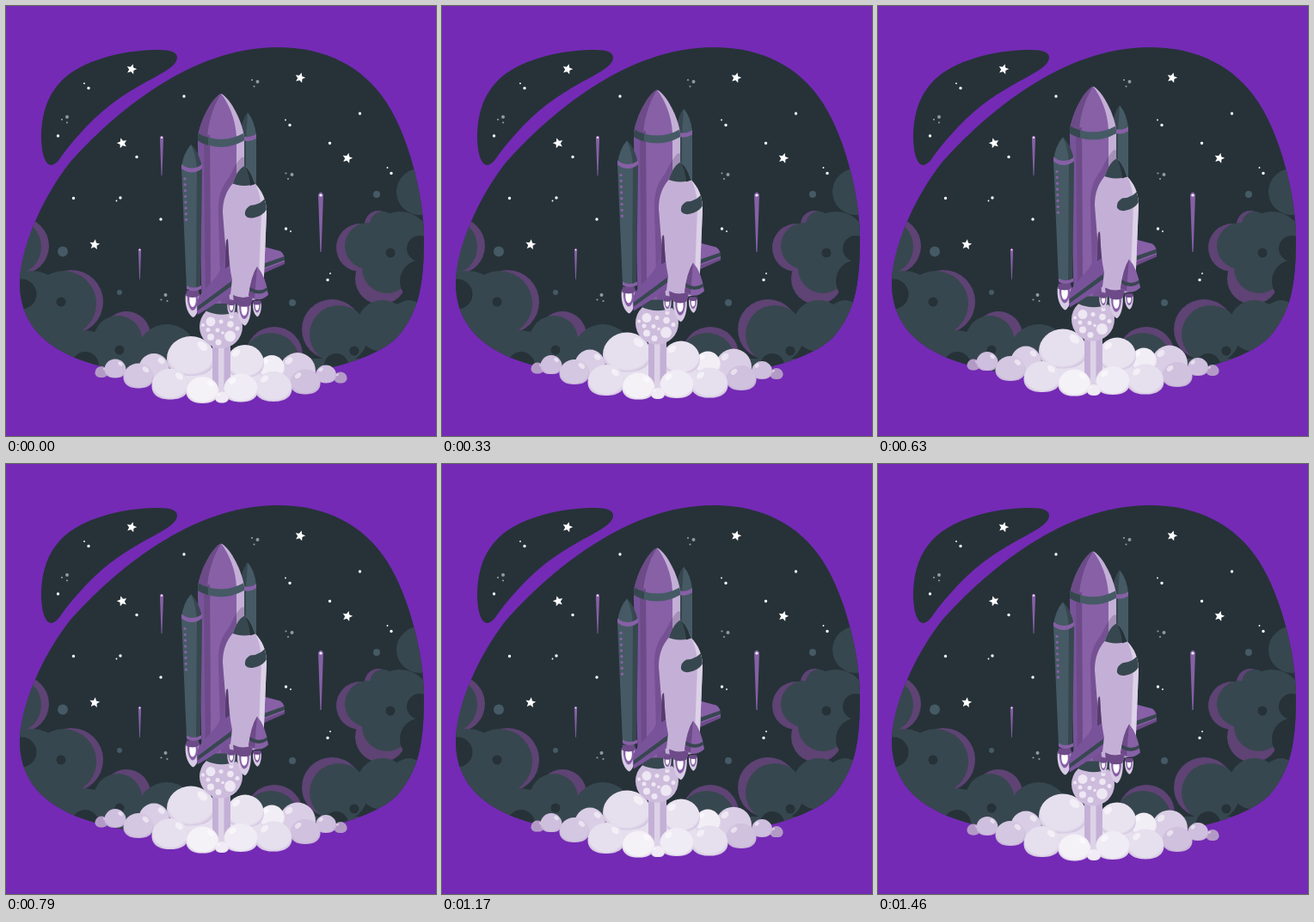
An HTML page that plays this animation: 500 px wide and 500 px high, repeating every 1.5 s.

```html
<!DOCTYPE html>
<html lang="en">
<head>
<meta charset="utf-8">
<title>Rocket launch</title>
<style>
html, body { margin: 0; width: 100%; height: 100%; overflow: hidden; background: #742ab5; }
svg { display: block; width: 100%; height: 100%; }
.dark { fill: #263238; }
.slate { fill: #37474f; }
.teal { fill: #455a64; }
.plum { fill: #5e4374; }
.deep { fill: #6d4a88; }
.grape { fill: #78539a; }
.violet { fill: #8760a6; }
.lilac { fill: #c4b0d6; }
.pale { fill: #ddd2e7; }
.dots { fill: none; stroke: #fff; stroke-linecap: round; }
</style>
</head>
<body>
<svg viewBox="0 0 500 500">
<defs>
  <path id="blob" d="M315 48C372 48 415 70 443 113C470 155 486 225 486 270C486 330 478 358 455 385C425 415 350 432 250 434C170 434 120 424 80 409C35 390 16 360 16 322C16 285 40 225 75 181C125 125 215 48 315 48Z"/>
  <clipPath id="inBlob"><use href="#blob"/></clipPath>
  <path id="tank" d="M250 102C258 105 273 128 277 152V346H228L223 152C227 128 242 105 250 102Z"/>
  <clipPath id="inTank"><use href="#tank"/></clipPath>
  <path id="orbiter" d="M277 186C270 190 266 199 264 206C256 215 252 226 252 240L260 341Q280 347 299 338L303 240C303 226 298 215 289 206C287 199 283 190 277 186Z"/>
  <clipPath id="inOrbiter"><use href="#orbiter"/></clipPath>
  <path id="star" d="M0-6.2L1.7-2.3 5.9-1.9 2.7.9 3.6 5 0 2.8-3.6 5-2.7.9-5.9-1.9-1.7-2.3Z" fill="#fff"/>
  <g id="meteor"><path class="violet" d="M-3 2Q0-3 3 2L.6 69H-.6Z"/><circle cy="3" r="1.6" fill="#fff"/></g>
  <g id="flame">
    <path fill="#d8cbe5" d="M-8 0C-10 14-4 26 1 27C6 24 9 12 8 0Z"/>
    <path class="violet" d="M-6-1C-7 11-3 19 0 19C4 19 7 10 6-1Z"/>
    <path fill="#fff" d="M-3.500 3C-4.500 11-2 15 0 15C3 14 4.500 10 3.500 3Z"/>
    <path class="deep" d="M-7-4H7L8 2Q0 6-8 2Z"/>
  </g>
  <radialGradient id="shade" cx=".5" cy=".47" r=".56">
    <stop offset=".82" stop-color="#a98bc0" stop-opacity="0"/>
    <stop offset="1" stop-color="#a98bc0" stop-opacity=".4"/>
  </radialGradient>
</defs>

<path class="dark" d="M199 60C199 75 160 85 120 116C95 136 75 160 63 177C50 195 42 180 41 155C41 125 48 98 75 78C105 58 145 51 178 51C192 51 199 54 199 60Z"/>
<use href="#blob" class="dark"/>

<g clip-path="url(#inBlob)">
  <g class="plum">
    <circle cx="17" cy="279" r="33"/><circle cx="76" cy="344" r="37"/><circle cx="140" cy="383" r="28"/>
    <circle cx="433" cy="254" r="16"/><circle cx="412" cy="281" r="28"/><circle cx="436" cy="317" r="30"/>
    <circle cx="379" cy="376" r="35"/><circle cx="312" cy="406" r="33"/>
  </g>
  <g class="slate">
    <circle cx="8" cy="280" r="33"/><circle cx="67" cy="346" r="38"/><circle cx="130" cy="388" r="28"/>
    <circle cx="187" cy="405" r="35"/><circle cx="30" cy="350" r="42"/>
    <path d="M16 345L80 375 230 400V440H60Z"/>
    <circle cx="481" cy="216" r="27"/><circle cx="438" cy="254" r="15"/><circle cx="421" cy="279" r="27"/>
    <circle cx="443" cy="305" r="29"/><circle cx="458" cy="275" r="36"/>
    <circle cx="387" cy="382" r="34"/><circle cx="438" cy="372" r="30"/><circle cx="470" cy="367" r="25"/>
    <circle cx="308" cy="413" r="33"/><path d="M280 410H440V440H280Z"/>
  </g>
  <g class="dark">
    <circle cx="18" cy="335" r="17.5"/><circle cx="64" cy="344" r="5.5"/><circle cx="92" cy="418" r="16"/>
    <circle cx="132" cy="400" r="5.5"/><circle cx="447" cy="287" r="5.5"/><circle cx="481" cy="282" r="15"/>
    <circle cx="483" cy="320" r="25"/><circle cx="405" cy="401" r="5.5"/><circle cx="384" cy="418" r="14"/>
  </g>
  <g class="teal">
    <circle cx="66" cy="285.5" r="6"/><circle cx="132" cy="333" r="3"/>
    <circle cx="333" cy="345" r="4"/><circle cx="431" cy="219" r="4"/>
  </g>
</g>

<use href="#star" transform="translate(146 73.5)rotate(15)"/>
<use href="#star" transform="translate(342 83.5)rotate(15)"/>
<use href="#star" transform="translate(135 159.5)rotate(-15)"/>
<use href="#star" transform="translate(397 177)rotate(15)"/>
<use href="#star" transform="translate(103 277.5)rotate(8)"/>
<path class="dots" stroke-width="3.4" d="M96 95.5h0M60.5 151h0M207 105h0M152 175.5h0M78.5 223.5h0M133 223h0M180 248h0M411.5 125h0M376.5 159.5h0M330 138.5h0M448 194.5h0M325.5 259h0M374 318.5h0"/>
<path class="dots" stroke-width="1.8" d="M91 90h0M128.5 226.5h0M325 132.5h0M443.5 188h0M331 262h0M377 311h0"/>
<g style="opacity:.5">
  <path class="dots" stroke-width="4" d="M71 129h0M292.5 88h0M332.5 196h0M185.5 336h0"/>
  <path class="dots" stroke-width="2.2" d="M65 132h0M71 135.5h0M286 86h0M288.5 93.5h0M325.5 194.5h0M328 201h0M180.5 341.5h0M187.5 343h0"/>
</g>
<use href="#meteor" transform="translate(181 151)scale(.7 .67)"/>
<use href="#meteor" transform="translate(366 217)"/>
<use href="#meteor" transform="translate(155.5 282)scale(.55 .52)"/>

<g id="launch">
  <ellipse cx="250" cy="432" rx="58" ry="15" fill="#e6dfee"/>
  <g id="backPuffs"></g>
  <path class="lilac" d="M240 385H261V452H240Z"/>
  <path class="pale" d="M247 385H253.500V452H247Z"/>
  <circle cx="250" cy="373" r="25" fill="#cdbcdc"/>
  <g fill="#eee7f4">
    <circle cx="238" cy="367" r="5.5"/><circle cx="250" cy="367" r="2.5"/><circle cx="261" cy="370" r="3.8"/>
    <circle cx="260.5" cy="384" r="6.5"/><circle cx="238" cy="385" r="4"/><circle cx="247" cy="391" r="3.5"/>
    <circle cx="235" cy="376.5" r="2.5"/><circle cx="246" cy="377" r="2.5"/><circle cx="229" cy="371" r="2"/>
    <circle cx="269" cy="375" r="2.5"/><circle cx="252" cy="380" r="1.8"/><circle cx="262" cy="361" r="2.5"/>
  </g>

  <path class="teal" d="M281 124Q289 133 291 150V235H272V152Q274 133 281 124Z"/>
  <path class="slate" d="M281 124Q274 133 272 152V235H279V155Z"/>
  <path class="violet" d="M272 150Q282 155 291 149V154Q282 160 272 155Z"/>

  <path class="slate" d="M229 343H272L269 355Q250 363 231 354Z"/>
  <use href="#tank" class="violet"/>
  <g clip-path="url(#inTank)">
    <path class="deep" d="M250 102C240 118 235 137 234 153L221 155V100Z"/>
    <path class="grape" d="M222 150H237L238 346H226Z"/>
    <path class="deep" d="M230 150H237L238 346H232Z"/>
    <path class="lilac" d="M250 102C259 113 267 132 268 152V200H280V100Z"/>
    <path fill="#3a1c50" opacity=".22" d="M274 176C266 184 263 193 259 200C249 212 246 226 247 243L250 346H280V176Z"/>
    <path class="teal" d="M222 147Q250 163 278 147V156Q250 172 222 156Z"/>
    <path class="slate" d="M222 147Q228 151 235 153V162Q228 160 222 156Z"/>
  </g>

  <use href="#flame" transform="translate(217 335)"/>
  <path class="teal" d="M215 161Q225 171 228 188L226 329Q218 334 210 329L204 188Q206 171 215 161Z"/>
  <path class="slate" d="M215 161Q225 171 228 188L226 329 221 331 222 190Q221 173 215 161Z"/>
  <path class="violet" d="M204 184Q216 193 228 184V189Q216 198 204 189Z"/>
  <path class="violet" d="M210 325Q218 330 227 325V329Q218 334 210 329Z"/>
  <path class="dots" style="stroke:#8760a6" stroke-width="3.4" stroke-dasharray="0 6.8" d="M208 201L209.5 250"/>

  <path class="violet" d="M300 280L319 285Q325 289 324 299L299 310Z"/>
  <path class="slate" d="M301 299L324 291V295.500L300 304.500Z"/>
  <path class="deep" d="M300 306L324 297V300L299 311Z"/>

  <use href="#flame" transform="translate(262 346)scale(.55)"/>
  <use href="#flame" transform="translate(292 345)scale(.6)"/>
  <use href="#flame" transform="translate(277 346)scale(.95)"/>
  <use href="#orbiter" class="lilac"/>
  <g clip-path="url(#inOrbiter)">
    <path class="pale" d="M286 200C294 212 297 225 297 240L293 342H310V186Z"/>
    <path class="slate" d="M260 184H294V205Q277 213 260 205Z"/>
    <path class="dark" d="M277 184Q283 195 284 209L295 205V184Z"/>
    <path class="slate" d="M304 219Q299 231 284 232Q277 236 278 243Q281 248 289 246Q299 244 304 235Z"/>
  </g>
  <path class="grape" d="M258 271Q259 300 263 319L261 335 223 359Q220 349 224 338L245 314Q254 301 256 273Q257 270 258 271Z"/>
  <path class="slate" d="M262 320L223 349V354L262 326Z"/>
  <path fill="#563b6c" d="M258 271Q259 289 260 302L255 305Q255 288 256 273Z"/>
  <path class="deep" d="M264 336Q276 342 287 336L286 345Q276 350 265 345Z"/>
  <path class="violet" d="M292 303Q302 314 305 336Q294 346 282 337Q285 314 292 303Z"/>
  <path class="deep" d="M292 303Q285 314 282 337L289 340Z"/>
  <path class="slate" d="M284 327Q294 334 304 327V331Q294 338 283 331Z"/>
  <g id="frontPuffs"></g>
</g>
</svg>
<script>
const PERIOD = 1500, LIFT = 10;
const launch = document.getElementById('launch');

// Each puff: centre x, centre y, horizontal radius, vertical radius, colour
const puff = ([x, y, rx, ry, color]) => {
  const side = Math.sign(250 - x), waist = y + ry * .12, base = y + ry;
  const dome = `d="M${x - rx} ${waist}A${rx} ${ry * 1.12} 0 0 1 ${x + rx} ${waist}`
    + `C${x + rx} ${y + ry * .75} ${x + rx * .55} ${base} ${x} ${base}`
    + `S${x - rx} ${y + ry * .75} ${x - rx} ${waist}Z"`;
  const shineX = x + side * rx * .48, shineY = y - ry * .5;
  return `<path ${dome} fill="${color}"/><path ${dome} fill="url(#shade)"/>
    <ellipse cx="${shineX}" cy="${shineY}" rx="${rx * .24}" ry="${ry * .19}"
      fill="#fff" opacity=".5" transform="rotate(${side * 40} ${shineX} ${shineY})"/>`;
};
const addPuffs = (id, list) => document.getElementById(id).innerHTML = list.map(puff).join('');

addPuffs('backPuffs', [
  [111, 425.5, 7.5, 6.5, '#b39ac6'], [389, 432, 7.5, 6.5, '#b39ac6'],
  [127, 421.5, 12.5, 11, '#cfbfde'], [372, 428, 12, 10.5, '#cfbfde'],
  [172, 421, 18, 17, '#d9cee5'], [339, 422, 21, 19, '#d9cee5'],
  [309, 420, 15, 14, '#f2eef6'], [278, 413, 22, 19, '#e9e3f0'],
  [215, 407, 28, 23, '#e6dfee']
]);
addPuffs('frontPuffs', [
  [154, 430, 17.5, 14.5, '#d4c7e1'], [348, 437, 17.5, 14.5, '#d0c1de'],
  [191, 439.5, 21.5, 18, '#e6dfee'], [311, 442.5, 21.5, 17.5, '#e6dfee'],
  [228.5, 446.5, 19, 15.5, '#f4f1f7'], [273, 444, 20, 16.5, '#f0ecf5'],
  [251, 455, 8, 6.5, '#f0ebf4']
]);

function draw() {
  const phase = performance.now() % PERIOD / PERIOD;
  const y = -LIFT * (1 - Math.abs(2 * phase - 1));
  launch.setAttribute('transform', `translate(0 ${y.toFixed(3)})`);
  requestAnimationFrame(draw);
}
draw();
</script>
</body>
</html>
```
